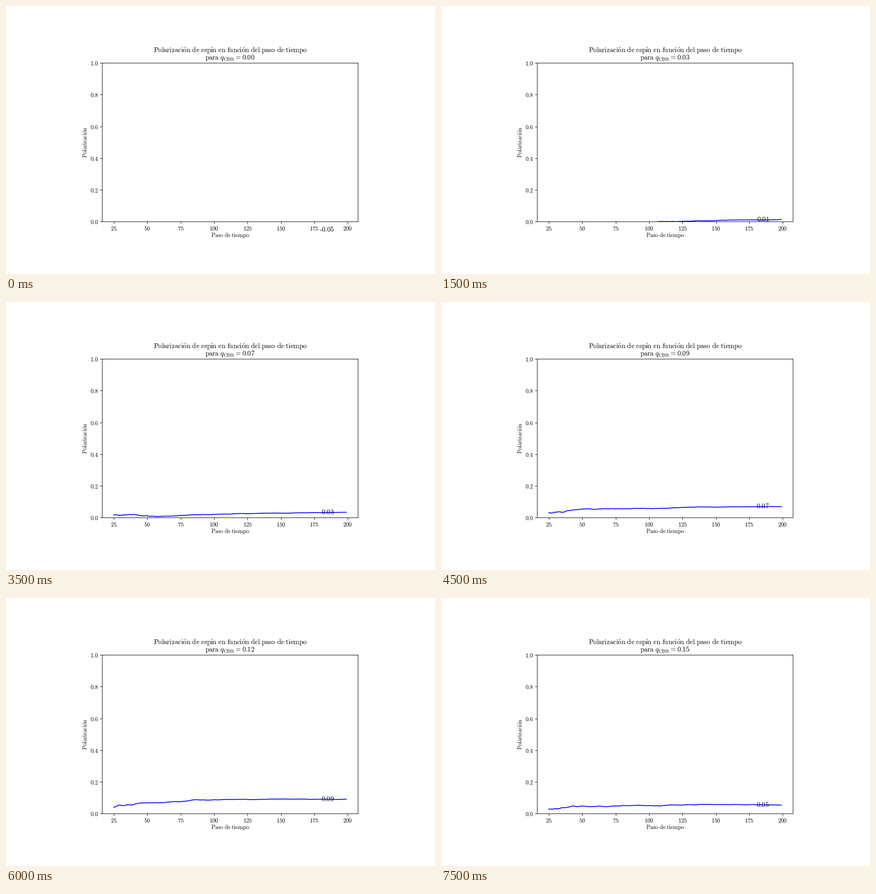
Write a matplotlib script that moves like this. It is 800 px wide and 500 px high and loops after 8 s.

```python
import numpy as np
import matplotlib.pyplot as plt
from matplotlib.animation import FuncAnimation

W, H = 800, 500
LEFT, RIGHT, TOP, BOTTOM = 179.3, 656.3, 106, 402.45
BIG, SMALL = 9.2, 7.65
STEPS = np.arange(25, 200)

# First and last polarisation of each curve, in percent
FIRST = [-6, 1.5, -1, -3, 0, 0, 1, 1.7, 4, 3, 6.2, 3, 4, 0.5, 2.5, 3]
LAST = [-4.8, -0.5, 1.8, 1.4, 2.2, 2.8, 3, 3.4, 1, 7, 13, 9, 9.1, 5.5, 6, 5.4]

plt.rcParams.update({
    "mathtext.fontset": "cm",
    "axes.linewidth": 0.6,
    "xtick.major.width": 0.6, "ytick.major.width": 0.6,
    "xtick.major.size": 2.625, "ytick.major.size": 2.625,
    "xtick.major.pad": 2.2, "ytick.major.pad": 2.625,
    "xtick.labelsize": SMALL, "ytick.labelsize": SMALL,
})


def curve(k):
    """Running mean that settles on its last value; wander shrinks as 1/n."""
    first, last = FIRST[k] / 100, LAST[k] / 100
    progress = (STEPS - STEPS[0]) / (STEPS[-1] - STEPS[0])
    settle = (1 - np.exp(-4 * progress)) / (1 - np.exp(-4))
    rng = np.random.default_rng(k)
    walk = np.cumsum(rng.normal(0, 0.07, STEPS.size) / STEPS)
    walk -= walk[0] + (walk[-1] - walk[0]) * progress
    return first + (last - first) * settle + walk


def roman(text):
    """Typeset plain Spanish text in upright Computer Modern."""
    for char, base in (("ó", "o"), ("í", "ı")):
        text = text.replace(char, rf"\acute{{{base}}}")
    text = text.replace("-", "\u2010").replace(" ", r"\ ")
    return rf"$\mathrm{{{text}}}$"


def put(x, y, text, size, **kw):
    return fig.text(x / W, 1 - y / H, text, size=size, ha="center",
                    va="baseline", rotation_mode="anchor", **kw)


fig = plt.figure(figsize=(W / 100, H / 100), dpi=100, facecolor="white")
ax = fig.add_axes([LEFT / W, 1 - BOTTOM / H, (RIGHT - LEFT) / W, (BOTTOM - TOP) / H])
ax.set_xlim(16.3, 207.7)
ax.set_ylim(0, 1)
xs = range(25, 201, 25)
ys = np.linspace(0, 1, 6)
ax.set_xticks(xs, [f"${x}$" for x in xs])
ax.set_yticks(ys, [f"${y:.1f}$" for y in ys])

mid = (LEFT + RIGHT) / 2
put(mid, 86.6, roman("Polarización de espín en función del paso de tiempo"), BIG)
put(mid, 431, roman("Paso de tiempo"), SMALL)
put(152.2, (TOP + BOTTOM) / 2 - 0.5, roman("Polarización"), SMALL, rotation=90)
heading = put(mid, 99.8, "", BIG)
line, = ax.plot([], [], color="blue", lw=1.125)
value = ax.text(190, 0, "", size=BIG, ha="right", va="center")


def update(k):
    data = curve(k)
    line.set_data(STEPS, data)
    value.set_y(data[-1])
    value.set_text(roman(f"{data[-1]:.2f}"))
    heading.set_text(rf"$\mathrm{{para}}\ q_{{\mathrm{{CISS}}}} = {k / 100:.2f}$")
    return line, value, heading


anim = FuncAnimation(fig, update, frames=len(LAST), interval=500,
                     repeat=True, repeat_delay=0)
plt.show()
```
